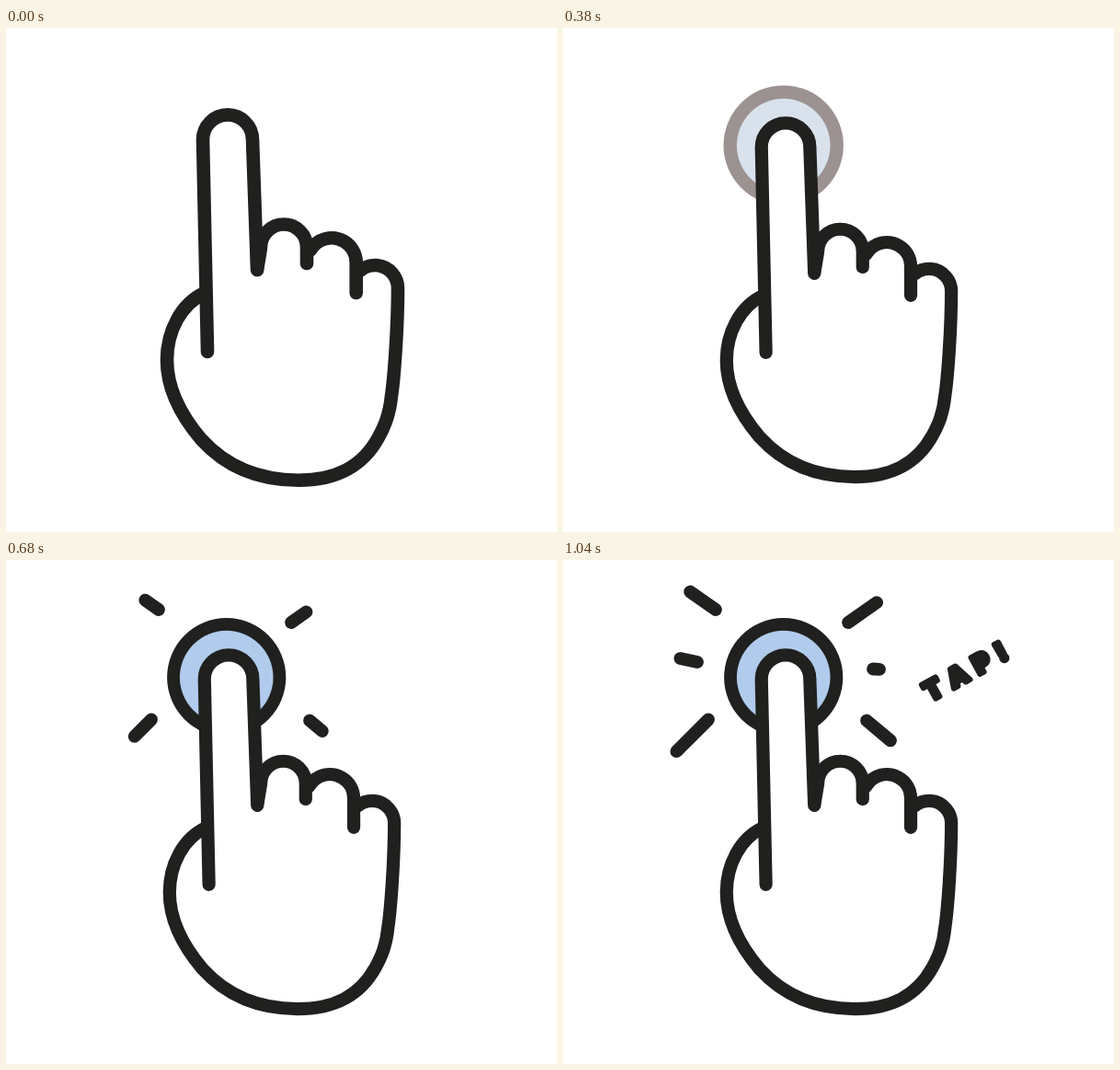
Animation, 599 px wide and 548 px high, one loop 1200 ms. Source, as an HTML page with a canvas:

```html
<!DOCTYPE html>
<html lang="en">
<head>
<meta charset="utf-8">
<title>Tap</title>
<style>
  html, body { margin: 0; width: 100%; height: 100%; overflow: hidden; background: #fff; }
  canvas { display: block; }
</style>
</head>
<body>
<canvas id="stage" width="599" height="548" role="img" aria-label="A pointing hand taps a button: TAP!"></canvas>
<script>
const ctx = document.getElementById("stage").getContext("2d");
const INK = "#20201f";
const LOOP = 1200;
const STARTS = [0, 200, 500, 800];
const rad = deg => deg * Math.PI / 180;

function dot(r, color) {
  ctx.fillStyle = color;
  ctx.beginPath();
  ctx.arc(239.7, 127.6, r, 0, Math.PI * 2);
  ctx.fill();
}

function drawButton(lit) {
  dot(lit ? 64.6 : 65.2, lit ? INK : "#9b9291");
  dot(50.8, lit ? "#b0cbec" : "#d9e2ec");
}

// Quarter to half circle ending at its right side, then straight down to y2
function knuckle(x, y, r, from, y2) {
  ctx.moveTo(x + r * Math.cos(rad(from)), y + r * Math.sin(rad(from)));
  ctx.arc(x, y, r, rad(from), 0);
  ctx.lineTo(x + r, y2);
}

function drawFinger() {
  ctx.beginPath();
  ctx.moveTo(219, 352);
  ctx.arc(241, 121.4, 27, Math.PI, 0);
  ctx.lineTo(273, 263);
  ctx.fillStyle = "#fff";
  ctx.fill();
  ctx.stroke();
}

function drawPalm() {
  ctx.beginPath();
  ctx.moveTo(273, 263);
  ctx.lineTo(277, 239);
  knuckle(302, 238.5, 25, 180, 256);
  knuckle(354, 255, 26.7, -150, 288);
  knuckle(401, 283, 25, -130, 283);
  ctx.bezierCurveTo(426, 325, 422, 380, 419, 400);
  ctx.bezierCurveTo(417, 420, 412, 432, 405, 445);
  ctx.bezierCurveTo(387, 478, 358, 491.7, 318, 491.7);
  ctx.bezierCurveTo(275, 491.7, 240, 478, 212, 447);
  ctx.bezierCurveTo(190, 421, 175, 392, 175, 361);
  ctx.bezierCurveTo(175, 330, 190, 300, 216, 288);
  ctx.stroke();
}

function drawHand(pressed) {
  ctx.save();
  if (pressed) ctx.transform(0.9736, 0, 0, 0.9683, 7.4, 12);
  ctx.lineWidth = 14.6;
  drawPalm();
  drawFinger();
  ctx.restore();
}

function ray(x, y, deg, length) {
  ctx.moveTo(x, y);
  ctx.lineTo(x + length * Math.cos(rad(deg)), y + length * Math.sin(rad(deg)));
}

function drawRays(full) {
  const grow = full ? 1 : 0.53;
  ctx.lineWidth = 13.8;
  ctx.beginPath();
  ray(166, 54, -145, 34 * grow);
  ray(310, 68, -35, 38 * grow);
  ray(158, 173.5, 135, 49 * grow);
  ray(330, 174.5, 40, 34 * grow);
  if (full) {
    ray(146, 111, 192, 19);
    ray(337, 118.5, 3, 7);
  }
  ctx.stroke();
}

function drawWord() {
  ctx.save();
  ctx.translate(399, 154);
  ctx.rotate(rad(-29));
  ctx.font = "800 28px Inter, sans-serif";
  ctx.fontKerning = "none";
  ctx.letterSpacing = "10px";
  ctx.fillStyle = INK;
  ctx.lineWidth = 6;
  ctx.strokeText("TAP!", 0, 0);
  ctx.fillText("TAP!", 0, 0);
  ctx.restore();
}

function draw(step) {
  ctx.fillStyle = "#fff";
  ctx.fillRect(0, 0, 599, 548);
  ctx.strokeStyle = INK;
  ctx.lineCap = ctx.lineJoin = "round";
  if (step > 0) drawButton(step > 1);
  drawHand(step > 0);
  if (step > 1) drawRays(step > 2);
  if (step > 2) drawWord();
}

const begin = performance.now();
function tick() {
  const t = (performance.now() - begin) % LOOP;
  draw(STARTS.filter(s => s <= t).length - 1);
  requestAnimationFrame(tick);
}
tick();
</script>
</body>
</html>
```
